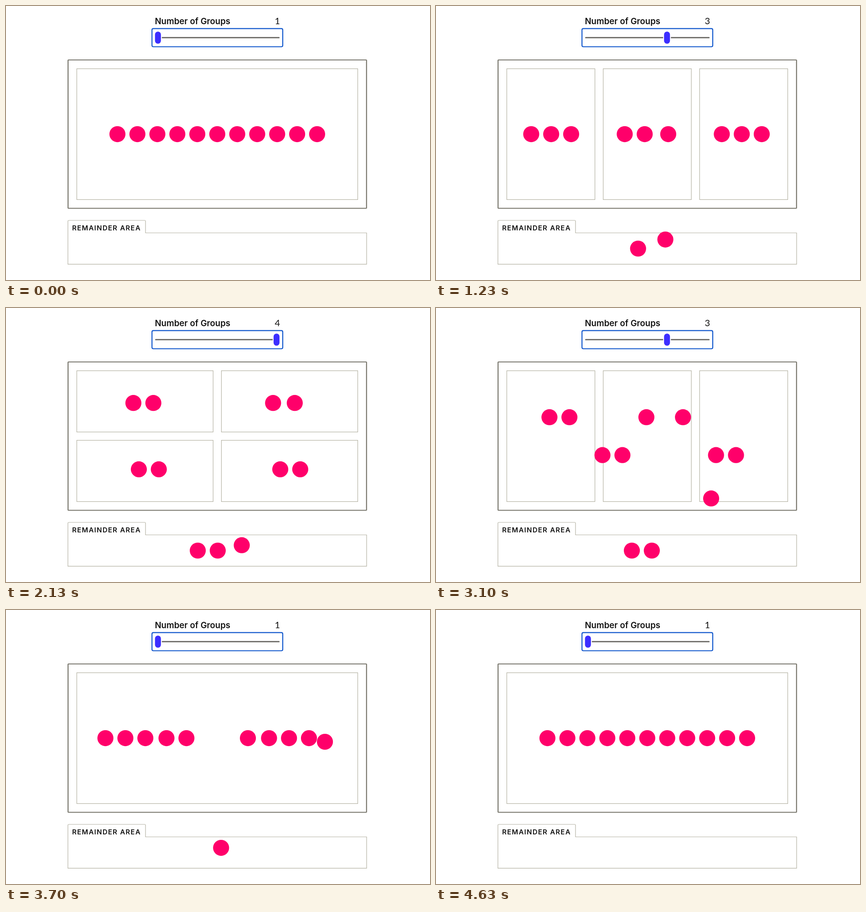
These frames come from a looping animation (930x602 px, 4770 ms). An HTML page:

```html
<!DOCTYPE html>
<html lang="en">
<head>
<meta charset="utf-8">
<title>Number of Groups</title>
<style>
  html, body { margin: 0; width: 100%; height: 100%; overflow: hidden; background: #fff; }
  svg { display: block; }
  text { fill: #121212; font-family: Inter, sans-serif; font-weight: 600; }
  .label { font-size: 18.6px; }
  .value { font: 400 20px Lato, sans-serif; text-anchor: end; }
  .tab { font-size: 15px; letter-spacing: 1.25px; }
  .focus { fill: none; stroke: #0f56cc; stroke-width: 2.2; }
  .track { stroke: #767571; stroke-width: 3; stroke-linecap: round; }
  .thumb { fill: #3c2eff; stroke: #fff; stroke-width: 4; paint-order: stroke; }
  .frame { fill: none; stroke: #77756b; stroke-width: 2.2; }
  .thin { fill: none; stroke: #b4b2a3; stroke-width: 1.2; }
  .dots { fill: #ff006a; }
</style>
</head>
<body>
<svg width="930" height="602" viewBox="0 0 930 602">
  <text class="label" x="326.5" y="39.5">Number of Groups</text>
  <text class="value" id="value" x="601" y="39.7"></text>
  <rect class="focus" x="320.2" y="49.7" width="286.8" height="39.8" rx="3"/>
  <path class="track" d="M328.5 69.5H598.7"/>
  <rect class="thumb" id="thumb" y="56.2" width="13" height="26.6" rx="6.5"/>
  <rect class="frame" x="136.1" y="118.5" width="654.7" height="326" rx="1"/>
  <g class="thin" id="boxes"></g>
  <path class="thin" d="M135.8 567.4V473q0-2 2-2H304q2 0 2 2V498.5H791V567.4Z"/>
  <text class="tab" x="145" y="492.8">REMAINDER AREA</text>
  <g class="dots" id="dots"></g>
</svg>
<script>
const LOOP = 4770, COUNT = 11, PITCH = 43.8, OMEGA = 0.02;
const AREA = { x: 155.3, y: 137.8, w: 616.2, h: 287.5, gap: 18.2 };
const REMAINDER = { x: 463.4, y: 533 };

// at: controls and boxes switch; go: dots start to move
const STEPS = [
  { at: 0, go: 0, groups: 1 },
  { at: 130, go: 190, groups: 2 },
  { at: 970, go: 1022, groups: 3 },
  { at: 1830, go: 1890, groups: 4 },
  { at: 2970, go: 3024, groups: 3 },
  { at: 3370, go: 3423, groups: 2 },
  { at: 3630, go: 3685, groups: 1 },
];

const $ = id => document.getElementById(id);

function add(parent, tag, attrs) {
  const node = document.createElementNS('http://www.w3.org/2000/svg', tag);
  for (const key in attrs) node.setAttribute(key, attrs[key]);
  return parent.appendChild(node);
}

function boxesFor(groups) {
  const cols = groups === 4 ? 2 : groups, rows = groups / cols;
  const w = (AREA.w - AREA.gap * (cols - 1)) / cols;
  const h = (AREA.h - AREA.gap * (rows - 1)) / rows;
  return Array.from({ length: groups }, (_, i) => ({
    x: AREA.x + (i % cols) * (w + AREA.gap),
    y: AREA.y + Math.floor(i / cols) * (h + AREA.gap),
    width: w, height: h,
  }));
}

function layoutFor(groups) {
  const size = Math.floor(COUNT / groups), rest = COUNT % groups;
  const boxes = boxesFor(groups);
  const inRow = (cx, y, slot, n) => ({ x: cx + (slot - (n - 1) / 2) * PITCH, y });
  return Array.from({ length: COUNT }, (_, i) => {
    const box = boxes[Math.floor(i / size)];
    // leftovers line up last one first
    if (!box) return inRow(REMAINDER.x, REMAINDER.y, COUNT - 1 - i, rest);
    return inRow(box.x + box.width / 2, box.y + box.height / 2, i % size, size);
  });
}

const layouts = [1, 2, 3, 4].map(layoutFor);
const boxSets = [1, 2, 3, 4].map(groups => {
  const set = add($('boxes'), 'g', {});
  boxesFor(groups).forEach(box => add(set, 'rect', box));
  return set;
});
const dots = layouts[0].map(() => add($('dots'), 'circle', { r: 17.6 }));

// critically damped spring: share of the way still to go
const remaining = ms => (1 + OMEGA * ms) * Math.exp(-OMEGA * ms);

function positions(t) {
  let points = layouts[0];
  STEPS.forEach(({ go, groups }, i) => {
    if (t < go) return;
    const until = Math.min(t, i + 1 < STEPS.length ? STEPS[i + 1].go : LOOP);
    const left = remaining(until - go);
    points = layouts[groups - 1].map((to, k) => ({
      x: to.x + (points[k].x - to.x) * left,
      y: to.y + (points[k].y - to.y) * left,
    }));
  });
  return points;
}

const begin = performance.now();
function draw() {
  const t = (performance.now() - begin) % LOOP;
  const { groups } = STEPS.filter(step => step.at <= t).pop();
  $('value').textContent = groups;
  $('thumb').setAttribute('x', 326.8 + (groups - 1) * 86.7);
  boxSets.forEach((set, i) => set.setAttribute('visibility', i === groups - 1 ? 'visible' : 'hidden'));
  positions(t).forEach((p, i) => {
    dots[i].setAttribute('cx', p.x);
    dots[i].setAttribute('cy', p.y);
  });
  requestAnimationFrame(draw);
}
draw();
</script>
</body>
</html>
```
